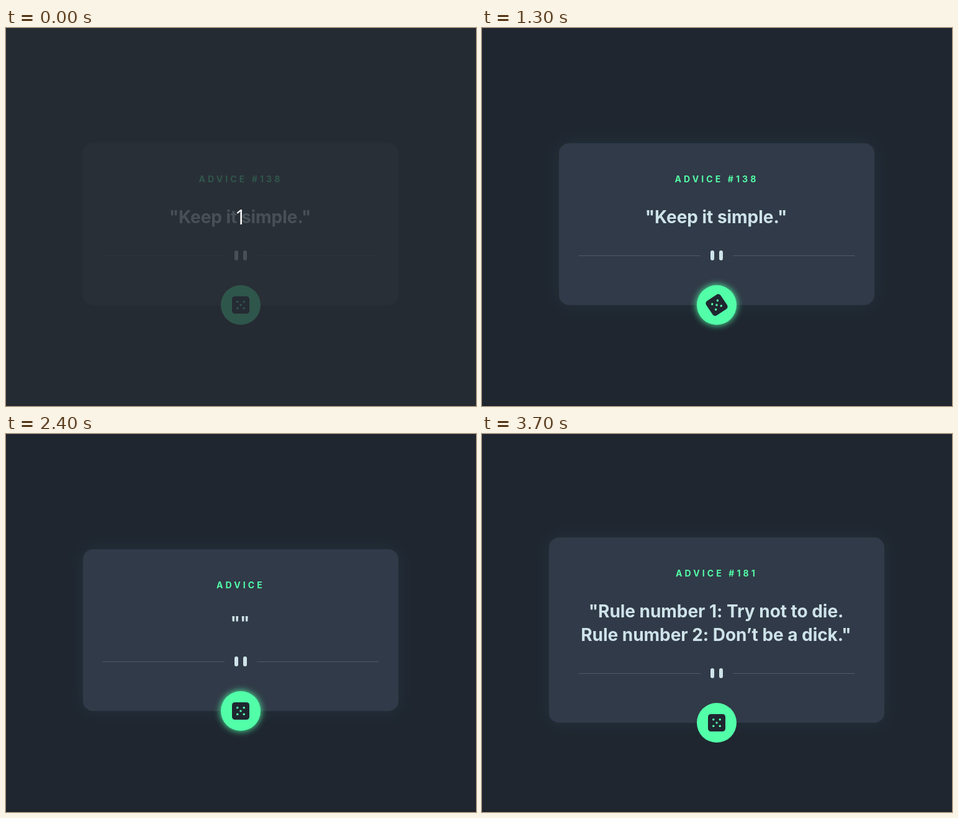
Animation of 757 by 610 pixels, one loop 4900 ms. Source, as an HTML page:

```html
<!DOCTYPE html>
<html lang="en">
<head>
<meta charset="utf-8">
<title>Advice card</title>
<style>
  html, body { margin: 0; width: 100%; height: 100%; overflow: hidden; background: #1f2630; }
  svg { display: block; }
  text { text-anchor: middle; font-family: Inter, "Open Sans", sans-serif; font-weight: 700; }
  #card { fill: #313a48; filter: drop-shadow(0 0 14px rgba(83, 220, 200, .08)); }
  #head { fill: #52ffa8; font-size: 14px; letter-spacing: 4.1px; }
  .quote { fill: #cee3e9; font-size: 28px; letter-spacing: -.04px; }
  #glow { filter: blur(6px); }
  .green { fill: #52ffa8; }
  .dark { fill: #1f2630; }
  #count text { fill: #fff; font: 400 32px "Open Sans", sans-serif; }
</style>
</head>
<body>
<svg width="757" height="610" viewBox="0 0 757 610">
  <rect y="608" width="757" height="2" fill="#1e222b"/>
  <rect id="card" rx="16"/>
  <g id="words">
    <text id="head" x="378" y="63"></text>
    <text id="line1" class="quote" x="377" y="129"></text>
    <text id="line2" class="quote" x="377" y="167"></text>
  </g>
  <g id="divider">
    <path d="M-222 .5H-26M26 .5H222" stroke="#4d5c70"/>
    <g fill="#cee3e9">
      <rect x="-10" y="-8" width="6" height="16" rx="3"/>
      <rect x="4" y="-8" width="6" height="16" rx="3"/>
    </g>
  </g>
  <g id="button">
    <circle id="glow" class="green" r="32"/>
    <circle class="green" r="32"/>
    <g id="dice">
      <rect class="dark" x="-14" y="-14" width="28" height="28" rx="4.67"/>
      <g class="green">
        <circle r="1.75"/>
        <circle cx="-5.25" cy="-5.25" r="1.75"/>
        <circle cx="5.25" cy="-5.25" r="1.75"/>
        <circle cx="-5.25" cy="5.25" r="1.75"/>
        <circle cx="5.25" cy="5.25" r="1.75"/>
      </g>
    </g>
  </g>
  <g id="count">
    <rect width="757" height="610" fill="#272c34" opacity=".8"/>
    <text x="378" y="317">1</text>
  </g>
</svg>
<script>
const LOOP = 4900, STEP = 100;
const $ = id => document.getElementById(id);
const set = (id, attrs) => {
  for (const name in attrs) $(id).setAttribute(name, attrs[name]);
};

// Linear interpolation through [time, value] points, held at both ends
function track(t, points) {
  let [t0, v0] = points[0];
  for (const [t1, v1] of points) {
    if (t < t1) return t <= t0 ? v0 : v0 + (v1 - v0) * (t - t0) / (t1 - t0);
    [t0, v0] = [t1, v1];
  }
  return v0;
}

const small = { x: 124, y: 186, width: 508, height: 261 };
const large = { x: 108, y: 167, width: 540, height: 299 };
const states = [
  { from: 0, box: small, text: ['ADVICE #138', '"Keep it simple."', ''] },
  { from: 2400, box: small, text: ['ADVICE', '""', ''] },
  { from: 2800, box: large, text: ['ADVICE #181', '"Rule number 1: Try not to die.',
                                   'Rule number 2: Don’t be a dick."'] }
];
let shown;

function layout(state) {
  const { box, text } = state, bottom = box.y + box.height;
  set('card', box);
  set('words', { transform: `translate(0 ${box.y})` });
  set('divider', { transform: `translate(378 ${bottom - 80})` });
  ['head', 'line1', 'line2'].forEach((id, i) => $(id).textContent = text[i]);
  shown = state;
}

function draw(t) {
  const state = states.findLast(s => t >= s.from);
  if (state !== shown) layout(state);

  const scale = track(t, [[1500, 1], [2125, 1.24], [2400, 1]]);
  const turn = track(t, [[850, 0], [1300, 56], [2000, 274.5], [2350, 360]]);
  const bottom = state.box.y + state.box.height;
  set('button', { transform: `translate(378 ${bottom}) scale(${scale})` });
  set('dice', { transform: `rotate(${turn})` });
  set('glow', { opacity: track(t, [[800, 0], [1200, 1], [3200, 1], [3700, 0]]) });
  set('words', { opacity: track(t, [[2450, 1], [2750, 0], [2860, 0], [3200, 1]]) });
  set('count', { visibility: t < 100 ? 'visible' : 'hidden' });
}

const start = performance.now();
function tick() {
  const t = (performance.now() - start) % LOOP;
  draw(Math.floor(t / STEP) * STEP);
  requestAnimationFrame(tick);
}
tick();
</script>
</body>
</html>
```
